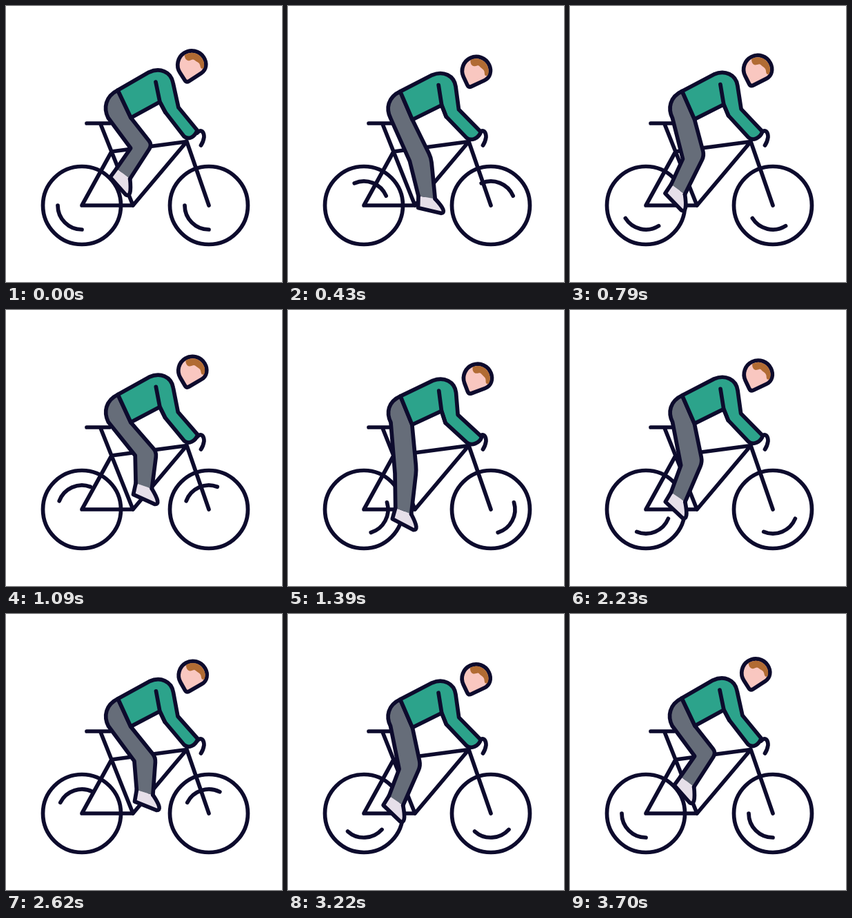
An HTML page for the animation above (3760 ms loop, 400 px wide and 400 px high).

```html
<!DOCTYPE html>
<html lang="en">
<head>
<meta charset="utf-8">
<title>Cyclist</title>
<style>
html, body { margin: 0; width: 100%; height: 100%; overflow: hidden; background: #fff; }
svg { display: block; width: 100vw; height: 100vh; }
.ink { fill: none; stroke: #0d0b2d; stroke-width: 5.7; stroke-linecap: round; stroke-linejoin: round; }
</style>
</head>
<body>
<svg viewBox="0 0 400 400">
  <g class="ink">
    <circle cx="110" cy="289" r="56.5"/>
    <circle cx="294" cy="289" r="56.5"/>
    <path class="glint" data-x="110" d="M-35 0A35 35 0 0 0 0 35"/>
    <path class="glint" data-x="294" d="M-35 0A35 35 0 0 0 0 35"/>
    <path d="M117 170H150M137 171L184 289H110L153 211L262 196.500L184 289M262 196.500L294 289"/>
    <path d="M277 184C283 177 287 183 287 190Q286 197 282.500 202"/>
  </g>
  <g class="ink">
    <path id="shoe" fill="#e6dfe9"/>
    <path id="pants" fill="#666d79"/>
    <path id="shirt" fill="#2ca38b"/>
    <path id="sleeve"/>
  </g>
  <g id="head">
    <path id="face" class="ink" style="fill:#f9c7c0" d="M-20.500 0A20.500 20.500 0 0 1 20.500 0C20.500 10 14 17.500 5 17.500H-16Q-20.500 17.500 -20.500 13Z"/>
    <path fill="#b16b33" d="M-1 -17.700C-4 -13 -3 -8 1 -7C4 -6 6 -7 7 -4C8 -1 9 0 10 3C11 7 8 9 9 12L11.500 13.500Q17.700 9 17.700 0A17.700 17.700 0 0 0 -1 -17.700Z"/>
  </g>
</svg>
<script>
const LOOP = 3760, STEP = 30, STEPS = 120, HOLD = 100, TURNS = 4 * 360;
const RAD = Math.PI / 180;

const $ = id => document.getElementById(id);
const glints = document.querySelectorAll('.glint');
const draw = (id, d) => $(id).setAttribute('d', d);
const pt = p => p[0].toFixed(2) + ' ' + p[1].toFixed(2);
const add = (p, x, y) => [p[0] + x, p[1] + y];

// p moved by (x, y) in axes turned by deg
function offset(p, deg, x, y) {
  const c = Math.cos(deg * RAD), s = Math.sin(deg * RAD);
  return add(p, x * c - y * s, x * s + y * c);
}

function toward(a, b, dist) {
  const k = dist / Math.hypot(b[0] - a[0], b[1] - a[1]);
  return add(a, (b[0] - a[0]) * k, (b[1] - a[1]) * k);
}

// steady speed, then even braking to rest
function roll(n, brake = 82) {
  const speed = 2 * TURNS / (brake + STEPS);
  return n < brake ? speed * n : TURNS - speed * (STEPS - n) ** 2 / (2 * (STEPS - brake));
}

function bezier(x, x1, y1, x2, y2) {
  const at = (u, a, b) => 3 * u * (1 - u) ** 2 * a + 3 * u * u * (1 - u) * b + u ** 3;
  let lo = 0, hi = 1;
  for (let i = 0; i < 30; i++) {
    const mid = (lo + hi) / 2;
    if (at(mid, x1, x2) < x) lo = mid; else hi = mid;
  }
  return at(lo, y1, y2);
}

function drawLeg(wave, waist, crotch, dip) {
  const ankle = [wave(179.5, 23, 0), wave(268, 27.5, 90)];
  const knee = [wave(187, 17, 305), wave(218, 17.5, 97)];
  const tilt = wave(30, 19, 222);
  const ankF = offset(ankle, tilt * .8, 12.3, 0);
  const ankB = offset(ankle, tilt * .8, -12.3, 0);
  const heel = offset(ankle, tilt, -9, 17.5);
  const toe = offset(ankle, tilt, 25, 18);
  const tip = offset(ankle, tilt, 35, 15);
  const kneeF = add(knee, 16, -2), kneeB = add(knee, -15, 3);
  const hip = [148 + dip, 162 + dip];

  draw('shoe', `M${pt(ankB)}L${pt(heel)}L${pt(toe)}Q${pt(tip)} ${pt(ankF)}`);
  draw('pants', `M${pt(ankB)}L${pt(kneeB)}L${pt(hip)}`
    + `C${pt(add(hip, -7, -14))} ${pt(add(hip, -4, -31 + dip))} ${pt(waist)}L${pt(crotch)}`
    + `L${pt(toward(kneeF, crotch, 7))}Q${pt(kneeF)} ${pt(toward(kneeF, ankF, 7))}L${pt(ankF)}`);
}

function drawBody(lean, waist, crotch, dip) {
  const elbowOut = [250 - 4 * dip, 147 + 5 * dip];
  const elbowIn = [231 - 3 * dip, 154 + 10 * dip];
  const cuffOut = [277 + 4 * dip, 180 + 4 * dip];
  const cuffIn = [258 + dip, 189 + 3 * dip];
  const pit = lean(223, 139);

  draw('shirt', `M${pt(waist)}L${pt(lean(207, 96))}`
    + `C${pt(lean(223, 88.5))} ${pt(lean(239, 95))} ${pt(lean(242, 111))}`
    + `L${pt(elbowOut)}L${pt(cuffOut)}C${pt(add(cuffOut, -3, 9))} ${pt(add(cuffIn, 7, 6))} ${pt(cuffIn)}`
    + `L${pt(elbowIn)}L${pt(pit)}L${pt(crotch)}Z`);
  draw('sleeve', `M${pt(lean(217, 110))}L${pt(pit)}L${pt(elbowIn)}`);
  $('head').setAttribute('transform',
    `translate(${269.2 + 6 * dip} ${85.3 + 14 * dip}) rotate(${13 * dip - 33})`);
}

function render(t) {
  const n = Math.max(0, Math.min(STEPS, Math.floor((t - HOLD) / STEP + 1e-6)));
  glints.forEach(g =>
    g.setAttribute('transform', `translate(${g.dataset.x} 289) rotate(${roll(n)})`));

  // every joint swings with the crank, each with its own lag
  const crank = 245.6 + TURNS * bezier(n / STEPS, .33, .31, .7, .97);
  const wave = (mid, amp, lag) => mid + amp * Math.cos((crank - lag) * RAD);
  const dip = wave(.48, .54, 95);

  // the torso sinks and tips forward about the waist
  const waist = [162 + dip, 122 + 3 * dip];
  const lean = (x, y) => offset(waist, 4.5 * dip, x - 162, y - 122);
  const crotch = lean(181 + dip, 162);
  drawLeg(wave, waist, crotch, dip);
  drawBody(lean, waist, crotch, dip);
}

const start = performance.now();
function tick() {
  render((performance.now() - start) % LOOP);
  requestAnimationFrame(tick);
}
tick();
</script>
</body>
</html>
```
